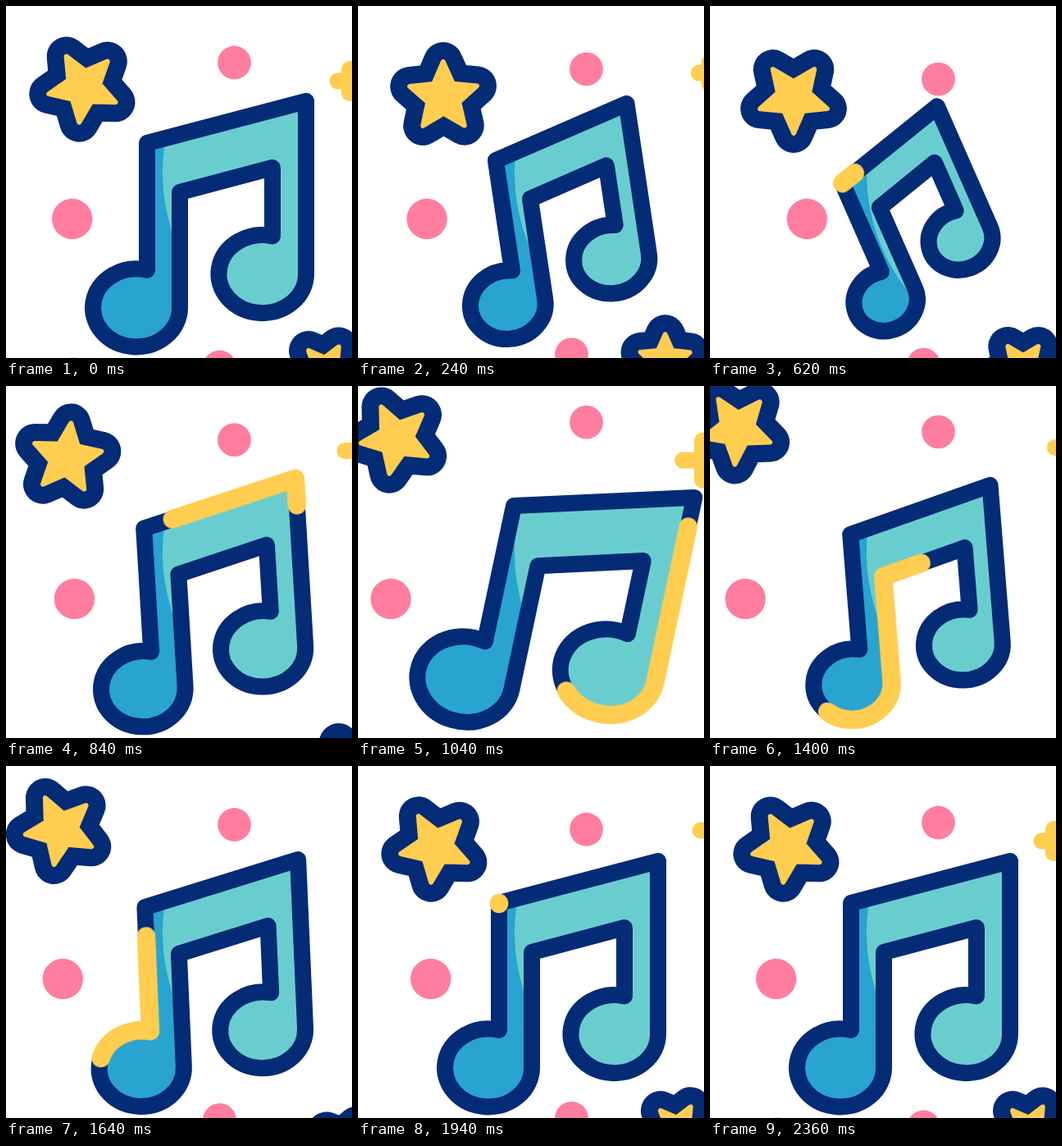
Animation, 422 px wide and 429 px high, one loop 3600 ms. Source, as an HTML page without scripts:

```html
<!DOCTYPE html>
<html lang="en">
<head>
<meta charset="utf-8">
<title>Music note</title>
<style>
@property --s { syntax: "<number>"; inherits: true; initial-value: 1; }
@property --tail { syntax: "<number>"; inherits: true; initial-value: 0; }
@property --head { syntax: "<number>"; inherits: true; initial-value: 0; }

html, body { margin: 0; width: 100%; height: 100%; overflow: hidden; background: #fff; }
svg { display: block; width: 100vw; height: 100vh; }

.move {
  animation-duration: 3600ms;
  animation-iteration-count: infinite;
  animation-timing-function: cubic-bezier(.3333, 0, .6667, 1);
}

path { stroke-linecap: round; stroke-linejoin: round; }
.pink { fill: #ff7e9f; }

/* Strokes keep their width while shapes scale */
.note {
  transform-origin: 234px 267px;
  scale: var(--s) calc(.08 + .92 * var(--s));
  animation-name: sway, pulse;
}
.line { fill: none; stroke: #032b76; stroke-width: calc(20px / var(--s)); }
.runner {
  stroke: #ffcd50;
  stroke-width: calc(22.5px / var(--s));
  stroke-dasharray: calc((var(--head) - var(--tail)) * 1px) 2000px;
  stroke-dashoffset: calc(var(--tail) * -1px);
  animation-name: head, tail, show;
}

.star { scale: var(--s); }
.rim { fill: #032b76; stroke: #032b76; stroke-width: calc(48px / var(--s)); }
.core { fill: #ffcd50; stroke: #ffcd50; stroke-width: calc(6px / var(--s)); }
.spin { animation-name: spin; }

.plus { scale: var(--s); animation-name: grow; }
.bars { fill: none; stroke: #ffcd50; stroke-width: calc(20px / var(--s)); }

.star-a { animation-name: star-a; }
.star-b { animation-name: star-b; }
.dot-a { animation-name: dot-a; }
.dot-b { animation-name: dot-b; }
.dot-c { animation-name: dot-c; }
.plus-a { animation-name: plus-a; }
.plus-b { animation-name: plus-b; }

@keyframes sway {
  0%, 51.111%, 100% { rotate: 0deg; }
  16.667% { rotate: -24deg; }
  28.889% { rotate: 12deg; }
  40% { rotate: -5deg; }
}
@keyframes pulse {
  0%, 48.889%, 100% { --s: 1; }
  14.444% { --s: .7; }
  28.889% { --s: 1.1; }
  38.889% { --s: .9; }
}
@keyframes head {
  0%, 14.444% { --head: 0; }
  48.889%, 100% { --head: 1000; }
}
@keyframes tail {
  0%, 20% { --tail: 0; }
  54.444%, 100% { --tail: 1000; }
}
@keyframes show {
  0%, 54.4%, 100% { opacity: 0; animation-timing-function: step-end; }
  14.5% { opacity: 1; animation-timing-function: step-end; }
}
@keyframes spin {
  0%, 55.556%, 100% { rotate: 0deg; }
  15% { rotate: 68deg; }
  33.611% { rotate: -8deg; }
  45.556% { rotate: 3.5deg; }
}
@keyframes star-a {
  0%, 53.333%, 100% { translate: 0 0; }
  12.222% { translate: 17px 21px; }
  36.111% { translate: -66px -50px; }
}
@keyframes star-b {
  0%, 53.333%, 100% { translate: 0 0; }
  10.556% { translate: -23px -16px; }
  35.556% { translate: 58px 60px; }
}
@keyframes dot-a {
  0%, 65.556%, 100% { translate: 0 0; }
  16.111% { translate: 0 21px; }
  30.278% { translate: 0 -26px; }
  51.389% { translate: 0 9px; }
}
@keyframes dot-b {
  0%, 4.444%, 65.556%, 100% { translate: 0 0; }
  16.667% { translate: 38px 0; }
  32.222% { translate: -51px 0; }
  53.889% { translate: 8px 0; }
}
@keyframes dot-c {
  0%, 61.111%, 100% { translate: 0 0; }
  8.333% { translate: 0 -17px; }
  31.944% { translate: 0 27px; }
  50% { translate: 0 -15px; }
}
@keyframes plus-a {
  0%, 60%, 100% { translate: 0 0; }
  16.667% { translate: 28px -28px; }
  28.889% { translate: 1px -1px; }
  47.222% { translate: 28px -28px; }
}
@keyframes plus-b {
  0%, 60%, 100% { translate: 0 0; }
  8.333%, 50% { translate: 0 30px; }
}
@keyframes grow {
  0%, 38.889%, 100% { --s: 1; }
  16.667% { --s: .72; }
  28.889% { --s: 1.65; }
}
</style>
</head>
<body>
<svg viewBox="0 0 422 429">
  <defs>
    <path id="note" pathLength="1000" d="M172 167L366 116V326.5A53.3 47.5 0 1 1 325 280.4V197L212 227V368A53 47.5 0 1 1 172 321.8Z"/>
    <path id="shape" d="M0-43L11.8-16.2 40.9-13.3 19 6.2 25.3 34.8 0 20-25.3 34.8-19 6.2-40.9-13.3-11.8-16.2Z"/>
    <g id="star" class="star" transform="rotate(-29)">
      <use href="#shape" class="rim"/>
      <use href="#shape" class="core"/>
    </g>
    <path id="bars" class="bars" d="M-14.5 0H14.5M0-14.5V14.5"/>
    <clipPath id="light"><circle cx="424" cy="203" r="233"/></clipPath>
  </defs>

  <circle class="pink move dot-a" cx="278.5" cy="69" r="20.4"/>
  <circle class="pink move dot-b" cx="80.7" cy="259.5" r="24.7"/>
  <circle class="pink move dot-c" cx="260.5" cy="440" r="20.4"/>

  <g transform="translate(419 91.5)">
    <g class="move plus-a"><g class="move plus"><use href="#bars"/></g></g>
  </g>
  <g transform="translate(82 452.5)">
    <g class="move plus-b"><g class="move plus"><use href="#bars"/></g></g>
  </g>

  <g transform="translate(94.5 99)">
    <g class="move star-a"><g class="move spin"><use href="#star"/></g></g>
  </g>
  <g transform="translate(390.5 443)" style="--s:.733">
    <g class="move star-b">
      <g transform="scale(-1 1)"><g class="move spin"><use href="#star"/></g></g>
    </g>
  </g>

  <g class="move note"><use href="#note" fill="#29a3cf"/></g>
  <g clip-path="url(#light)">
    <g class="move note"><use href="#note" fill="#69cdd0"/></g>
  </g>
  <g class="move note">
    <use href="#note" class="line"/>
    <use href="#note" class="line move runner"/>
  </g>
</svg>
</body>
</html>
```
